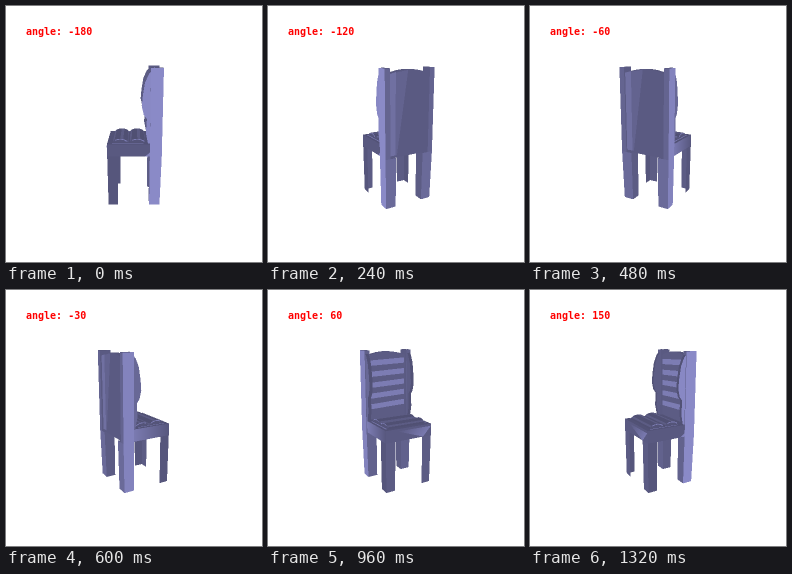
Write an HTML page with a canvas that moves like this. It is 256x256 px and loops after 1440 ms.

```html
<!DOCTYPE html>
<html>
<head>
<meta charset="utf-8">
<style>
html, body { margin: 0; width: 100%; height: 100%; overflow: hidden; background: #fff; }
canvas { position: absolute; left: 0; top: 0; width: 256px; height: 256px; }
#label {
  position: absolute; left: 20px; top: 21px; white-space: pre; color: #f00;
  font: bold 10px/10px "DejaVu Sans Mono", monospace;
}
</style>
</head>
<body>
<canvas id="view" width="512" height="512"></canvas>
<div id="label"></div>
<script>
const SIZE = 512, STEP = 120, COUNT = 12;
const ctx = document.getElementById('view').getContext('2d');
const label = document.getElementById('label');
const image = ctx.createImageData(SIZE, SIZE);
const depth = new Float32Array(SIZE * SIZE);

// Points are [u, y, l]: toward the chair's back, up, sideways.
const faces = [];
const face = (shade, ...points) => faces.push({ shade, points });

// rect = [u0, u1, l0, l1]; shades = [back, front, left, right, top], null leaves a side open
function prism(y0, low, y1, high, shades) {
  const ring = (y, [u0, u1, l0, l1]) =>
    [[u0, y, l0], [u1, y, l0], [u1, y, l1], [u0, y, l1]];
  const a = ring(y0, low), b = ring(y1, high);
  [2, 0, 3, 1].forEach((side, i) => {
    const j = (i + 1) % 4;
    if (shades[side]) face(shades[side], a[i], a[j], b[j], b[i]);
  });
  if (shades[4]) face(shades[4], ...b);
}
const box = (y0, y1, rect, shades) => prism(y0, rect, y1, rect, shades);
const span = (side, a, b) => side > 0 ? [a, b] : [-b, -a];

const wing = [[.68, 2.56], [.49, 2.33], [.37, 2.05], [.3, 1.6], [.27, 1.25],
  [.34, .95], [.45, .8], [.42, .3], [.5, -.1]];

for (const side of [-1, 1]) {
  const flanks = (outer, inner) => side > 0 ? [inner, outer] : [outer, inner];
  const bright = side > 0 ? 138 : 131;
  // back post, wider below the seat
  prism(-2.5, [.57, .96, ...span(side, .57, .97)], -.58, [.57, 1, ...span(side, .57, 1)],
    [106, 98, ...flanks(bright, 92), 90]);
  box(-.58, 2.55, [.57, 1, ...span(side, .8, 1)], [100, 96, ...flanks(bright, 90), 82]);
  // front leg: only the two outer faces
  prism(-2.5, [-.96, -.6, ...span(side, .6, .96)],
    -.5, [-.97, -.58, ...span(side, .57, .97)], [null, 92, ...flanks(86, null), null]);
  // bulging wing in front of the post
  for (let i = 1; i < wing.length; i++) {
    const [u0, y0] = wing[i - 1], [u1, y1] = wing[i];
    const o = side * .97, n = side * .84;
    face(side > 0 ? 136 : 104, [u0, y0, o], [.7, y0, o], [.7, y1, o], [u1, y1, o]);
    face(92, [u0, y0, n], [.7, y0, n], [.7, y1, n], [u1, y1, n]);
    face(82, [u0, y0, o], [u0, y0, n], [u1, y1, n], [u1, y1, o]);
  }
}

// back panel with a rounded crest
const crest = i => 2.5 - .0095 * i * i;
function panel(u, shade) {
  const points = [[u, -.58, .82], [u, -.58, -.82]];
  for (let i = -4; i <= 4; i++) points.push([u, crest(i), i * .205]);
  face(shade, ...points);
}
panel(.92, 90);
panel(.68, 92);
for (let i = -4; i < 4; i++)
  face(86, [.92, crest(i), i * .205], [.92, crest(i + 1), (i + 1) * .205],
    [.68, crest(i + 1), (i + 1) * .205], [.68, crest(i), i * .205]);
// light wedge on the left of the back
face(99, [.935, 2.36, .8], [.935, 2.48, .06], [.935, -.5, .5], [.935, -.5, .8]);
face(112, [.94, 2.36, .8], [.94, 2.42, .55], [.94, -.5, .56], [.94, -.5, .8]);
for (let i = 0; i < 5; i++) {
  const y = .3 + i * .42;
  face(124, [.65, y, -.75], [.65, y + .06, .75], [.65, y + .27, .75], [.65, y + .2, -.75]);
}

// seat
box(-.58, -.12, [-.97, .92, -.97, .97], [90, 90, [88, 132, 132, 88], 89, 82]);
face(130, [.92, -.14, .985], [.92, -.57, .985], [.4, -.57, .985]);
face([122, 122, 90], [-.985, -.2, .95], [-.985, -.57, .6], [-.985, -.2, -.5]);

// two cushion rolls
for (const mid of [-.5, .12]) {
  const at = (i, l, r = 1) => [mid - .29 * r * Math.cos(i * Math.PI / 8),
    -.12 + .15 * r * Math.sin(i * Math.PI / 8), l];
  for (let i = 0; i < 8; i++) {
    face(i % 3 == 1 ? 92 : 80, at(i, -.78), at(i + 1, -.78), at(i + 1, .78), at(i, .78));
    for (const l of [-.78, .78]) {
      face(84, [mid, -.12, l], at(i, l), at(i + 1, l));
      if (i > 1 && i < 7)
        face(124, at(i, l * 1.01), at(i + 1, l * 1.01),
          at(i + 1, l * 1.01, .8), at(i, l * 1.01, .8));
    }
  }
}
for (const l of [-.88, .83])
  face(118, [-.8, -.11, l], [.35, -.11, l], [.35, -.11, l + .05], [-.8, -.11, l + .05]);

const TILT = 15 * Math.PI / 180, DIST = 11.7, FOCAL = 302;
function project([u, y, l], turn) {
  const c = Math.cos(turn), s = Math.sin(turn);
  const x = u * c - l * s, z = u * s + l * c;
  const near = 1 / (DIST - y * Math.sin(TILT) - z * Math.cos(TILT));
  const v = y * Math.cos(TILT) - z * Math.sin(TILT);
  return [2 * (128 + FOCAL * x * near), 2 * (128 - FOCAL * v * near), near];
}

function triangle(a, b, c, sa, sb, sc) {
  const area = (b[0] - a[0]) * (c[1] - a[1]) - (b[1] - a[1]) * (c[0] - a[0]);
  if (Math.abs(area) < 1e-6) return;
  const low = k => Math.floor(Math.min(a[k], b[k], c[k]));
  const high = k => Math.ceil(Math.max(a[k], b[k], c[k]));
  for (let y = low(1); y <= high(1); y++)
    for (let x = low(0); x <= high(0); x++) {
      const px = x + .5, py = y + .5;
      const wb = ((px - a[0]) * (c[1] - a[1]) - (py - a[1]) * (c[0] - a[0])) / area;
      const wc = ((b[0] - a[0]) * (py - a[1]) - (b[1] - a[1]) * (px - a[0])) / area;
      const wa = 1 - wb - wc;
      if (wa < 0 || wb < 0 || wc < 0) continue;
      const near = wa * a[2] + wb * b[2] + wc * c[2], i = y * SIZE + x;
      if (near <= depth[i]) continue;
      depth[i] = near;
      const s = wa * sa + wb * sb + wc * sc;
      image.data.set([s, s, s * 1.44, 255], i * 4);
    }
}

function draw(angle) {
  depth.fill(0);
  image.data.fill(255);
  const turn = (angle + 180) * Math.PI / 180;
  for (const { shade, points } of faces) {
    const p = points.map(q => project(q, turn));
    const s = i => Array.isArray(shade) ? shade[i] : shade;
    for (let i = 2; i < p.length; i++)
      triangle(p[0], p[i - 1], p[i], s(0), s(i - 1), s(i));
  }
  ctx.putImageData(image, 0, 0);
  label.textContent = 'angle: ' + angle;
}

let shown = -1, start;
function tick(now) {
  start ??= now;
  const step = Math.floor((now - start) / STEP) % COUNT;
  if (step !== shown) draw(-180 + 30 * (shown = step));
  requestAnimationFrame(tick);
}
draw(-180);
requestAnimationFrame(tick);
</script>
</body>
</html>
```
